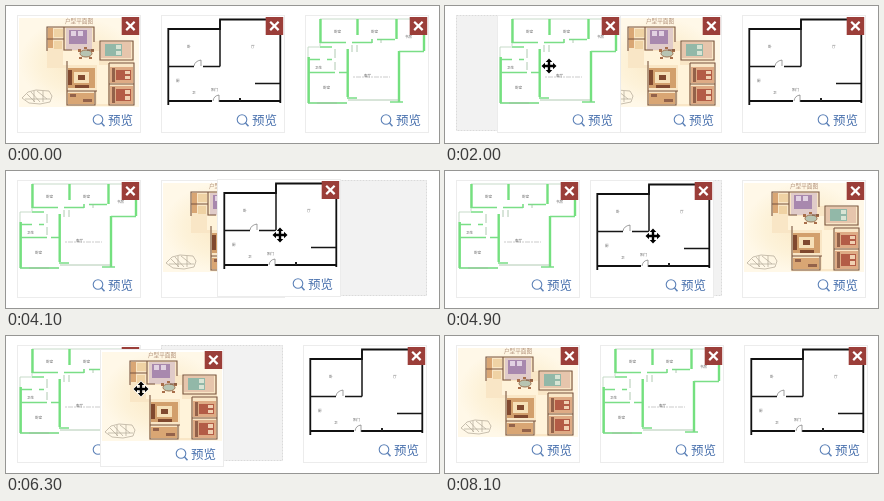
Write an HTML page that moves like this. It is 433 by 137 pixels and loops after 8200 ms.

```html
<!DOCTYPE html>
<html lang="zh">
<head>
<meta charset="utf-8">
<title>拖动排序</title>
<style>
  html, body { margin: 0; width: 100%; height: 100%; overflow: hidden; background: #fff; }
  svg { display: block; width: 433px; height: 137px; }
  text { font-family: "Noto Sans CJK SC", "Noto Sans CJK", sans-serif; }
  .label { font-size: 12.5px; fill: #4870ad; }
  .tiny { font-size: 3.6px; fill: #666; }
  .title { font-size: 5.6px; fill: #b08f78; }
</style>
</head>
<body>
<svg viewBox="0 0 433 137">
  <defs>
    <radialGradient id="paper">
      <stop offset="0" stop-color="#fbe9c6"/>
      <stop offset=".65" stop-color="#fdf2d9"/>
      <stop offset="1" stop-color="#fff8e8"/>
    </radialGradient>

    <g id="frame">
      <rect x=".5" y=".5" width="123" height="117" fill="#fff" stroke="#ececec"/>
    </g>

    <g id="controls">
      <rect x="104.7" y="2" width="17.5" height="18" fill="#9b3e39"/>
      <path d="M109.2 6.7l8.4 8.4m0-8.4l-8.4 8.4" stroke="#fff" stroke-width="2.2"/>
      <g fill="none" stroke="#5d82b8" stroke-width="1.1">
        <circle cx="81" cy="104.5" r="4.8"/>
        <path d="M84.5 108l3 3.2" stroke-width="1.5"/>
      </g>
      <text class="label" x="91" y="110">预览</text>
    </g>

    <g id="painted">
      <rect x="2" y="3" width="120" height="89" fill="url(#paper)"/>
      <text class="title" x="48" y="8">户型平面图</text>
      <path d="M30 12H77V26H117V91H49V53H30Z" fill="#f9e6c6"/>
      <path d="M46 36h36v14h-36zM80 50h11v39h-11z" fill="#fff3da"/>
      <path d="M31 13h5v20h-5zM51 78h26v11h-26z" fill="#d9a674"/>
      <path d="M37 14h9v8h-9zM37 26h8v8h-8z" fill="#efd2a4"/>
      <path d="M49 13h26v22h-26z" fill="#e0cbc9"/>
      <path d="M52 15h18v14h-18z" fill="#a888ae"/>
      <path d="M54 16h5v5h-5zM61 16h5v5h-5z" fill="#e2d2e2"/>
      <path d="M84 27h30v16h-30z" fill="#e6c5ac"/>
      <path d="M88 29h17v12h-17z" fill="#92b8a8"/>
      <path d="M99 30h5v4h-5zM99 36h5v4h-5z" fill="#d8e4d4"/>
      <path d="M51 53h27v20h-27z" fill="#d29f6c"/>
      <path d="M57 57h15v11h-15z" fill="#f6e0b8"/>
      <path d="M51 55h4v15h-4zM58 70h14v3h-14zM61 60h7v5h-7z" fill="#80492f"/>
      <path d="M93 52h23v16h-23zM93 71h23v18h-23z" fill="#deab85"/>
      <path d="M99 55h15v10h-15zM99 74h15v12h-15z" fill="#b35c46"/>
      <path d="M108 56h5v3h-5zM108 61h5v3h-5zM108 75h5v4h-5zM108 81h5v4h-5z" fill="#f0d0b2"/>
      <path d="M95 53h3v14h-3zM95 72h3v16h-3zM53 79h6v3h-6zM66 84h9v3h-9z" fill="#93624a"/>
      <ellipse cx="69" cy="38.5" rx="6" ry="3.5" fill="#b7c4b2" stroke="#9c7655"/>
      <path d="M61 34h3v3h-3zM67 32h3v2h-3zM74 34h3v3h-3zM62 42h3v2h-3zM72 42h3v2h-3z" fill="#a86e4a"/>
      <path d="M30 36V12H77V27M47 12V35H55M70 35H77M83 26H116V45H83ZM50 46V76H80M92 48V90H117V48H92M92 69H117M50 76V90H78V76M30 24H47" fill="none" stroke="#795540" stroke-width="1.1"/>
      <path d="M5 83l6-6 8-2 13 1 3 5-2 6-10 2-11-1zM10 79l8 8m-4-10l9 10m-3-11l10 8M8 84h25M17 76v11m9-11v11" fill="none" stroke="#b0a796" stroke-width=".7"/>
    </g>

    <g id="walls">
      <path d="M7.3 90V14H59V4.5H119.3V88M7 86H51M58 86H120" fill="none" stroke="#111" stroke-width="1.8"/>
      <path d="M59 5V51.5M7 51.5H33M42 51.5H59M94 68.5H119" fill="none" stroke="#161616" stroke-width="1.5"/>
      <path d="M33 51a9 7 0 0 1 7-6v6M52 86a7 7 0 0 1 6-6v7" fill="none" stroke="#777" stroke-width=".7"/>
      <path d="M78 83h2v3h-2z" fill="#222"/>
      <g class="tiny">
        <text x="26" y="33">卧</text><text x="90" y="33">厅</text>
        <text x="15" y="67">厨</text><text x="31" y="79">卫</text>
        <text x="50" y="76">阳门</text>
      </g>
    </g>

    <g id="green">
      <path d="M15 4H119V36M15 4V31M3 32V88H42M3 32H15" fill="none" stroke="#b9d2bb" stroke-width=".8"/>
      <path d="M15.5 4V28M52.5 4V20M91.5 4V24M119 6V36M3.7 42V88M42.7 34V82M94 36V87" fill="none" stroke="#74e07f" stroke-width="2.4"/>
      <path d="M15 27.5H41M47 27.5H67M72 24.5H90M94 36.5H119M4 44.5H15M22 44.5H27M4 57.5H30M34 57.5H42M15 32H27M3 88H42M42 83H52M85 87H98M67 24V28" fill="none" stroke="#7ade86" stroke-width="1.6"/>
      <path d="M30 34v9m0 4v8m17-25v7m5-7v7m24-13v4M43 85H94M12 88h20" fill="none" stroke="#9dbda0" stroke-width=".8"/>
      <path d="M48 62H85" stroke="#aaa" stroke-width=".6" stroke-dasharray="2 1 5 1"/>
      <g class="tiny">
        <text x="29" y="18">卧室</text><text x="66" y="18">卧室</text>
        <text x="100" y="23">书房</text><text x="10" y="54">卫生</text>
        <text x="18" y="74">卧室</text><text x="59" y="62">客厅</text>
      </g>
    </g>
  </defs>

  <rect id="gap" x=".5" y="9.5" width="121" height="115" fill="#f2f2f2" stroke="#dadada" stroke-dasharray="2 1"/>
  <g id="cards"></g>
  <path id="cursor" d="M0-7.5L3.3-4H1.2V-1.2H4V-3.3L7.5 0 4 3.3V1.2H1.2V4H3.3L0 7.5-3.3 4H-1.2V1.2H-4V3.3L-7.5 0-4-3.3V-1.2H-1.2V-4H-3.3Z" fill="#000" stroke="#fff" stroke-width="1.4" paint-order="stroke"/>
</svg>
<script>
const LOOP = 8200, STEP = 100, LEFT = 11, TOP = 9, PITCH = 144, GAP_PITCH = 142;
const START = ["painted", "walls", "green"];

// time, x, y of the pointer
const path = [
  [900, 421, 62], [1200, 356, 60], [1300, 356, 60], [1400, 351, 60],
  [1800, 101, 60], [2000, 104, 60], [2800, 104, 60], [3300, 360, 65],
  [3600, 360, 65], [4500, 206, 64], [4700, 205, 64], [4900, 208, 65],
  [5000, 208, 65], [5400, 339, 49], [5600, 339, 49], [6300, 135, 53],
  [6700, 51, 50], [7300, 51, 50]
];

// slots: when the open place moves, and to which position
const drags = [
  { card: "green", from: 1400, to: 2800, grab: [52, 51], slots: [[1400, 2], [1600, 1], [1900, 0]] },
  { card: "walls", from: 3600, to: 5000, grab: [63, 56], slots: [[3600, 2], [4200, 1]] },
  { card: "painted", from: 5600, to: 6900, grab: [41, 40], slots: [[5600, 2], [6100, 1], [6500, 0]] }
];

const byId = id => document.getElementById(id);
const layer = byId("cards"), gap = byId("gap"), cursor = byId("cursor");
const cards = {};

for (const name of START) {
  const g = document.createElementNS("http://www.w3.org/2000/svg", "g");
  g.innerHTML = ["frame", name, "controls"].map(id => `<use href="#${id}"/>`).join("");
  layer.append(g);
  cards[name] = g;
}

const place = (el, x, y) => el.setAttribute("transform", `translate(${x} ${y})`);
const show = (el, on) => el.setAttribute("visibility", on ? "visible" : "hidden");

function pointer(t) {
  const i = path.findIndex(p => p[0] > t);
  if (i < 1) return null;
  const [t0, x0, y0] = path[i - 1], [t1, x1, y1] = path[i];
  const k = (t - t0) / (t1 - t0);
  return [Math.round(x0 + (x1 - x0) * k), Math.round(y0 + (y1 - y0) * k)];
}

function moveTo(order, card, slot) {
  const rest = order.filter(name => name !== card);
  rest.splice(slot, 0, card);
  return rest;
}

function draw(time) {
  const t = Math.floor((time % LOOP) / STEP) * STEP;
  const pos = pointer(t);
  let order = START, held = null;

  for (const d of drags) {
    if (t < d.from) break;
    const slot = d.slots.filter(s => s[0] <= t).pop()[1];
    order = moveTo(order, d.card, slot);
    if (t < d.to) held = d;
  }

  let x = LEFT;
  for (const name of order) {
    if (held && name === held.card) {
      place(gap, x, 0);
      place(cards[name], pos[0] - held.grab[0], pos[1] - held.grab[1]);
      if (layer.lastChild !== cards[name]) layer.append(cards[name]);
      x += GAP_PITCH;
    } else {
      place(cards[name], x, TOP);
      x += PITCH;
    }
  }

  show(gap, held);
  show(cursor, pos);
  if (pos) place(cursor, ...pos);
}

function tick() {
  draw(performance.now());
  requestAnimationFrame(tick);
}
tick();
</script>
</body>
</html>
```
